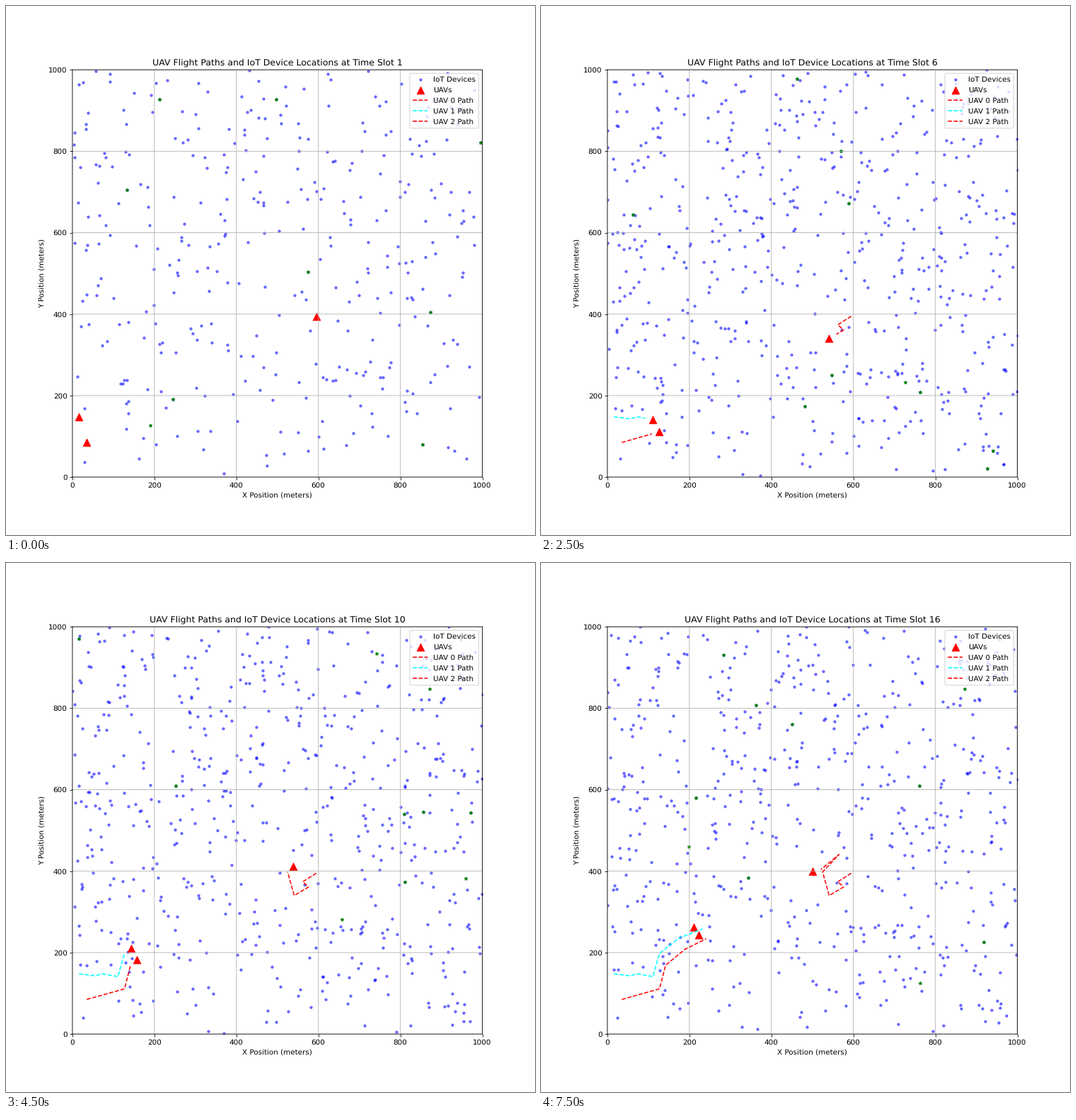
Animation of 748x748 px, one loop 8000 ms. Source, as a matplotlib script:

```python
import numpy as np
import matplotlib.pyplot as plt
from matplotlib.animation import FuncAnimation

SLOTS = 16
SIDE = 1000
MAX_DEVICES = 600
MAX_ACTIVE = 10

# Turning points of each flight as (slot, x, y); speed is constant between
TURNS = [
    [(1, 595, 395), (3, 562, 374), (4, 576, 361), (6, 541, 340),
     (9, 525, 398), (12, 565, 441), (15, 521, 404), (16, 501, 400)],
    [(1, 16, 148), (3, 55, 143), (4, 73, 148), (6, 111, 141),
     (9, 127, 198), (12, 175, 236), (15, 232, 258), (16, 211, 263)],
    [(1, 35, 85), (6, 127, 111), (9, 142, 169), (12, 189, 208),
     (15, 241, 234), (16, 223, 243)],
]
COLORS = ["red", "cyan", "red"]

# Devices that stay active for a while: x, y, first slot, last slot
LASTING = [(190, 127, 1, 4), (726, 232, 4, 8), (742, 935, 10, 12),
           (872, 847, 10, 16), (960, 383, 10, 14), (658, 282, 10, 12),
           (454, 343, 12, 14), (198, 461, 14, 16), (763, 126, 14, 16)]


def fly(turns):
    slot, x, y = np.transpose(turns)
    time = np.arange(1, SLOTS + 1)
    return np.column_stack([np.interp(time, slot, x),
                            np.interp(time, slot, y)])


def walk_devices(rng):
    """Random walk of every device, clipped to the area."""
    spot = rng.random((MAX_DEVICES, 2))
    spot[:, 1] **= 0.85
    spots = [SIDE * spot]
    for _ in range(SLOTS - 1):
        step = rng.normal(0, 3, spot.shape)
        spots.append(np.clip(spots[-1] + step, 0, SIDE))
    return spots


def pick_active(slot, spots, rng):
    """Lasting active devices, topped up with random ones."""
    kept = [(x, y) for x, y, first, last in LASTING if first <= slot <= last]
    picks = rng.choice(len(spots), MAX_ACTIVE - len(kept), replace=False)
    return np.array(kept + list(spots[picks]))


rng = np.random.default_rng(7)
routes = np.array([fly(turns) for turns in TURNS])
walk = walk_devices(rng)
devices = [spots[:min(350 + 125 * i, MAX_DEVICES)]
           for i, spots in enumerate(walk)]
active = [pick_active(i + 1, spots, rng) for i, spots in enumerate(devices)]

# Soft, unsnapped lines and text
plt.rcParams.update({"path.snap": False, "text.hinting": "none"})
fig, ax = plt.subplots(figsize=(10, 10), dpi=74.8)
fig.subplots_adjust(left=0.1255, right=0.9005, bottom=0.1095, top=0.8795)

dots = ax.scatter([], [], s=10, c="blue", alpha=0.5, label="IoT Devices")
stars = ax.scatter([], [], s=20, c="green", marker="*")
uavs = ax.scatter([], [], s=100, c="red", marker="^", label="UAVs")
paths = [ax.plot([], [], "--", color=color, label=f"UAV {i} Path")[0]
         for i, color in enumerate(COLORS)]

ax.set(xlim=(0, SIDE), ylim=(0, SIDE),
       xlabel="X Position (meters)", ylabel="Y Position (meters)")
ax.grid(True)
ax.legend(loc="upper right")


def update(i):
    dots.set_offsets(devices[i])
    stars.set_offsets(active[i])
    uavs.set_offsets(routes[:, i])
    for path, route in zip(paths, routes):
        path.set_data(route[:i, 0], route[:i, 1])
    ax.set_title("UAV Flight Paths and IoT Device Locations "
                 f"at Time Slot {i + 1}")
    return [dots, stars, uavs, *paths]


anim = FuncAnimation(fig, update, frames=SLOTS, interval=500, repeat=True,
                     repeat_delay=0, blit=False)
plt.show()
```
